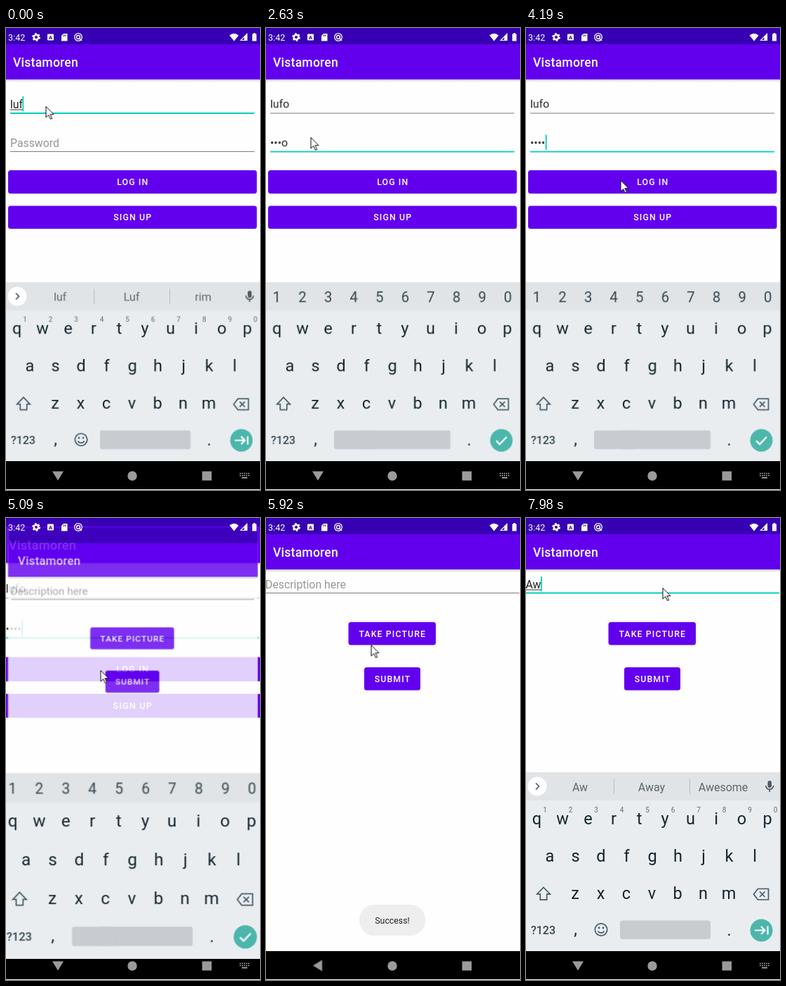
These frames come from a looping animation (362 by 656 pixels, 8000 ms). An HTML page:

```html
<!DOCTYPE html>
<html lang="en">
<head>
<meta charset="utf-8">
<title>Login and post</title>
<style>
  html, body { margin: 0; width: 100%; height: 100%; overflow: hidden; background: #fefefe; }
  svg { display: block; width: 362px; height: 656px; font-family: Roboto, "Noto Sans", sans-serif; }
  text { white-space: pre; }
  .mid { text-anchor: middle; }
  .title { font-size: 17.6px; font-weight: 500; letter-spacing: .2px; fill: #fff; }
  .field { font-size: 15.84px; fill: #222; }
  .hint { font-size: 15.84px; fill: #969696; }
  .label { font-size: 12.32px; font-weight: 500; letter-spacing: 1.12px; fill: #fff; text-anchor: middle; }
  .key { font-size: 23.5px; fill: #14252d; text-anchor: middle; }
  .digit { font-size: 20.5px; fill: #37474f; text-anchor: middle; }
  .tiny { font-size: 10px; fill: #626c71; text-anchor: middle; }
  .word { font-size: 16px; fill: #5c666b; text-anchor: middle; }
  .line { fill: none; stroke: #455a64; stroke-width: 1.7; }
  .white { fill: none; stroke: #fff; stroke-width: 2.2; }
  .accent { fill: #03cfbb; }
  .rest { fill: #7d7d7d; }
</style>
</head>
<body>
<svg viewBox="0 0 362 656">
  <defs>
    <linearGradient id="shade" x2="0" y2="1">
      <stop stop-color="#000" stop-opacity=".2"/><stop offset="1" stop-color="#000" stop-opacity="0"/>
    </linearGradient>
    <g id="frame">
      <rect x="-4.6" width="371.2" height="656" fill="#fefefe"/>
      <rect x="-4.6" y="73" width="371.2" height="4" fill="url(#shade)"/>
      <rect x="-4.6" y="22" width="371.2" height="51" fill="#6200ee"/>
      <rect x="-4.6" width="371.2" height="23" fill="#3700b3"/>
      <text class="title" x="10" y="55">Vistamoren</text>
    </g>
  </defs>

  <g id="login">
    <use href="#frame"/>
    <rect id="userRest" class="rest" x="6" y="120.5" width="348" height="1"/>
    <rect id="userFocus" class="accent" x="6" y="120" width="348" height="2"/>
    <rect id="passRest" class="rest" x="6" y="175" width="348" height="1"/>
    <rect id="passFocus" class="accent" x="6" y="174.7" width="348" height="1.8"/>
    <text id="hint" class="hint" x="6" y="168.5">Password</text>
    <g id="loginText"></g>
    <rect id="userCaret" class="accent" y="97" width="1.8" height="21"/>
    <rect id="passCaret" class="accent" y="151.5" width="1.8" height="21.5"/>
    <g id="loginButtons"></g>
    <rect id="press" x="3" y="202" width="354.5" height="33" rx="3.5" fill="#fff"/>
  </g>

  <g id="home">
    <use href="#frame"/>
    <rect id="postRest" class="rest" y="106" width="361" height="1"/>
    <rect id="postFocus" class="accent" y="105.5" width="361" height="2"/>
    <text id="postHint" class="hint" x="-1" y="99.5">Description here</text>
    <g id="postText"></g>
    <rect id="postCaret" class="accent" y="83" width="1.8" height="21"/>
    <g id="homeButtons"></g>
  </g>

  <rect y="615" width="362" height="40" fill="#000"/>

  <g id="keyboard">
    <rect y="361" width="362" height="254" fill="#e9edf0"/>
    <rect y="361" width="362" height="40" fill="#e0e4e7"/>
    <g id="keys"></g>
    <path class="line" d="M25 524.5l9.3 9.7h-4.6v8h-9.4v-8h-4.6z"/>
    <path class="line" d="M330.5 526.5h15v15.500h-15l-6-7.750zM333 530.500l7.500 7.500m0-7.500l-7.500 7.500"/>
    <text x="24.500" y="590.500" class="mid" font-size="16" font-weight="500" fill="#37474f">?123</text>
    <text x="70.500" y="592" class="key">,</text>
    <text x="289.500" y="593" class="key">.</text>
    <rect x="134" y="571.500" width="129" height="26.500" rx="3" fill="#c8ccd0"/>
    <circle cx="335.500" cy="585.500" r="16" fill="#4db6ac"/>
    <g id="textMode">
      <circle cx="16" cy="381" r="13.500" fill="#fff"/>
      <path class="line" d="M14 376.500l4.500 4.500-4.500 4.500"/>
      <rect x="344.500" y="373" width="5.500" height="10" rx="2.750" fill="#50595e"/>
      <path class="line" stroke-width="1.500" d="M341.800 380a5.400 5.400 0 0 0 10.800 0M347.200 385.500v3.500"/>
      <g id="digits"></g>
      <circle class="line" cx="107" cy="584.500" r="8.700"/>
      <path class="line" d="M102.500 586.500a4.800 4 0 0 0 9 0"/>
      <circle cx="104" cy="582" r="1.400" fill="#455a64"/><circle cx="110" cy="582" r="1.400" fill="#455a64"/>
    </g>
    <g id="passMode">
      <rect x="97" y="571.500" width="60" height="26.500" rx="3" fill="#c8ccd0"/>
    </g>
    <path id="tab" class="white" d="M326 585.500h14m-5-5.500l5.500 5.500-5.500 5.500M344.500 579.500v12"/>
    <path id="check" class="white" d="M328 586l5 5 10-10.500"/>
    <g id="words"></g>
  </g>

  <g id="nav" fill="#9b9b9b">
    <path id="back" d="M66 629.500h16l-8 13z"/>
    <circle cx="180" cy="636" r="6.700"/>
    <rect x="279.500" y="629.500" width="13.500" height="13"/>
    <g id="switcher">
      <path d="M333 632.500h14m-14 3h14" stroke="#b0b0b0" stroke-width="1.700" stroke-dasharray="1.700 1.300" fill="none"/>
      <path d="M336 638.600h8" stroke="#b0b0b0" stroke-width="1.700"/>
    </g>
  </g>

  <g id="status" fill="#fff">
    <text x="3" y="17.500" font-size="12.600">3:42</text>
    <circle cx="43" cy="13" r="3.300" fill="none" stroke="#fff" stroke-width="2.400"/>
    <circle cx="43" cy="13" r="5" fill="none" stroke="#fff" stroke-width="1.800" stroke-dasharray="2.600 2.636"/>
    <rect x="59" y="8.500" width="9" height="9" rx="1"/>
    <text x="63.500" y="16" class="mid" font-size="8" font-weight="700" fill="#3700b3">A</text>
    <path d="M82 8h5.500v10.500h-8.500v-7.500z"/>
    <path d="M82.500 9.500v2.500m2-2.500v2.500" stroke="#3700b3"/>
    <circle cx="103" cy="13" r="5.300" fill="none" stroke="#fff" stroke-width="1.300"/>
    <circle cx="103" cy="13" r="2.500" fill="none" stroke="#fff" stroke-width="1.300"/>
    <path d="M104 14l4 4" stroke="#fff" stroke-width="1.300"/>
    <path d="M318.500 10.500q6.500-5.500 13 0l-6.500 8z"/>
    <path d="M343.500 8.500v9h-9z" fill="none" stroke="#fff" stroke-width="1.200"/>
    <path d="M343.500 8v10h-4v-6z"/>
    <path d="M351 8.500h1.700v-1.500h2.600v1.500h1.700v10h-6z"/>
  </g>

  <g id="toast">
    <rect x="133" y="549" width="94" height="44" rx="21" fill="#ededed" opacity=".9"/>
    <text x="180" y="576" class="mid" font-size="12.320" fill="#222">Success!</text>
  </g>

  <path id="mouse" d="M.5.5v15.500l3.700-3.400 2.700 5.800 2.300-1-2.700-5.700h5z" fill="#fff" stroke="#111" stroke-width="1"/>
</svg>

<script>
const LOOP = 8000;
const $ = id => document.getElementById(id);

// Plays a table of [time, value] rows with hard changes.
function steps(el, prop, rows) {
  const frames = rows.map(([time, value]) =>
    ({ offset: time / LOOP, [prop]: value, easing: 'step-end' }));
  frames.push({ offset: 1, [prop]: rows[rows.length - 1][1] });
  el.animate(frames, { duration: LOOP, iterations: Infinity });
}

// Shows an element only during the given [from, to] spans.
function show(el, ...spans) {
  const rows = spans[0][0] > 0 ? [[0, 0]] : [];
  for (const [from, to] of spans) {
    rows.push([from, 1]);
    if (to < LOOP) rows.push([to, 0]);
  }
  steps(el, 'opacity', rows);
}

function add(parent, tag, attrs, content = '') {
  const el = document.createElementNS($('login').namespaceURI, tag);
  for (const name in attrs) el.setAttribute(name, attrs[name]);
  el.textContent = content;
  $(parent).append(el);
  return el;
}

const write = (parent, cls, x, y, content) => add(parent, 'text', { class: cls, x, y }, content);
const place = (x, y, scale = 1) => `translate(${x}px, ${y}px) scale(${scale})`;
const zoom = scale => place(181 * (1 - scale), 328 * (1 - scale), scale);
const move = (el, rows) => steps(el, 'transform', rows.map(([t, x, y]) => [t, place(x, y)]));

function button(parent, x, y, width, height, label) {
  add(parent, 'rect', { x, y: y + 1, width, height, rx: 3.5, fill: '#000', opacity: .12 });
  add(parent, 'rect', { x, y, width, height, rx: 3.5, fill: '#6200ee' });
  write(parent, 'label', x + width / 2 + .5, y + height / 2 + 4.6, label);
}
button('loginButtons', 3, 202, 354.5, 33, 'LOG IN');
button('loginButtons', 3, 252.5, 354.5, 32.5, 'SIGN UP');
button('homeButtons', 117.5, 147.7, 124.5, 32.5, 'TAKE PICTURE');
button('homeButtons', 140, 212, 80, 32.5, 'SUBMIT');

// Keys
const PITCH = 36.5;
[['qwertyuiop', 15.5, 434.5], ['asdfghjkl', 34, 487.5], ['zxcvbnm', 70, 540.5]].forEach(([row, x, y]) =>
  [...row].forEach((letter, i) => write('keys', 'key', x + i * PITCH, y, letter)));
[...'1234567890'].forEach((digit, i) => {
  write('digits', 'tiny', 27 + i * PITCH, 417.5, digit);
  write('passMode', 'digit', 15.3 + i * 36.6, 389.5, digit);
});

function suggest(from, to, ...words) {
  const row = add('words', 'g', { id: 'words' + from });
  words.forEach((word, i) => write(row.id, 'word', 77 + i * 102, 387.5, word));
  for (const x of [125, 233])
    add(row.id, 'rect', { x, y: 370.5, width: 1, height: 21, fill: '#b4babd' });
  show(row, [from, to]);
}
suggest(0, 150, 'luf', 'Luf', 'rim');
suggest(150, 1100, 'lufo', 'Lufo', 'loft');
suggest(7670, 7980, 'A', 'As', 'About');
suggest(7980, LOOP, 'Aw', 'Away', 'Awesome');

// Typed text
function typed(parent, x, y, rows) {
  for (const [from, to, content] of rows)
    show(write(parent, 'field', x, y, content), [from, to]);
}
function underline(parent, x, y, width, from, to) {
  show(add(parent, 'rect', { x, y, width, height: 1, fill: '#333' }), [from, to]);
}
typed('loginText', 6, 113.5, [[0, 150, 'luf'], [150, LOOP, 'lufo']]);
underline('loginText', 6, 115.5, 18, 0, 150);
underline('loginText', 6, 115.5, 27, 150, 960);
typed('loginText', 6, 168.5, [
  [1780, 1910, 'l'], [1910, 2170, '•u'], [2170, 2630, '••f'], [2630, 3500, '•••o'], [3500, LOOP, '••••']
]);
typed('postText', -.5, 99.5, [[7550, 7980, 'A'], [7980, LOOP, 'Aw']]);
underline('postText', 0, 101.5, 10, 7550, 7980);
underline('postText', 0, 101.5, 21.5, 7980, LOOP);

// Focus and carets
show($('hint'), [0, 1780]);
show($('userFocus'), [0, 960]);
show($('userRest'), [960, LOOP]);
show($('passRest'), [0, 960]);
show($('passFocus'), [960, LOOP]);
show($('userCaret'), [0, 550], [820, 960]);
move($('userCaret'), [[0, 23.3, 0], [150, 32.4, 0]]);
show($('passCaret'), [960, 1370], [1780, 2630], [4190, LOOP]);
move($('passCaret'), [[0, 6, 0], [1780, 10, 0], [1910, 20.5, 0], [2170, 23, 0], [2630, 27.7, 0]]);
show($('postHint'), [0, 7550]);
show($('postRest'), [0, 6460]);
show($('postFocus'), [6460, LOOP]);
show($('postCaret'), [6460, 7120], [7550, LOOP]);
move($('postCaret'), [[0, -.3, 0], [7550, 9.5, 0], [7980, 21, 0]]);
steps($('press'), 'opacity', [[0, 0], [3500, .18], [3630, 0]]);

// Screen change
steps($('login'), 'transform', [[0, zoom(1)], [5090, zoom(1.036)], [5220, zoom(1.05)]]);
steps($('home'), 'transform', [[0, zoom(.9)], [5090, zoom(.959)], [5220, zoom(.995)], [5370, zoom(1)]]);
steps($('home'), 'opacity', [[0, 0], [5090, .82], [5220, 1]]);

// Keyboard
steps($('keyboard'), 'transform', [
  [0, zoom(1)], [5090, zoom(1.036)], [5220, place(0, 40)], [5370, place(0, 300)],
  [6580, place(0, 110)], [6700, place(0, 40)], [6850, place(0, 6)], [6980, place(0, 0)]
]);
steps($('keyboard'), 'opacity', [
  [0, 1], [5220, .5], [5370, 0], [6580, .2], [6700, .6], [6850, .94], [6980, 1]
]);
show($('textMode'), [0, 1100], [5370, LOOP]);
show($('passMode'), [1100, 5370]);
show($('tab'), [0, 1100], [6850, LOOP]);
show($('check'), [1100, 6850]);

// Navigation bar
$('back').style.transformOrigin = '74px 635.5px';
steps($('back'), 'transform', [
  [0, 'rotate(0deg)'], [5220, 'rotate(45deg)'], [5370, 'rotate(90deg)'],
  [6580, 'rotate(60deg)'], [6700, 'rotate(18deg)'], [6850, 'rotate(2deg)'], [6980, 'rotate(0deg)']
]);
steps($('nav'), 'fill', [[0, '#9b9b9b'], [6700, '#f2f2f2'], [6850, '#b4b4b4'], [6980, '#9b9b9b']]);
show($('switcher'), [0, 5220], [6700, LOOP]);

steps($('toast'), 'opacity', [[0, 0], [5370, .5], [5520, 1], [6980, .4], [7120, 0]]);

move($('mouse'), [
  [0, 56.5, 111], [550, 59, 124], [690, 62, 143], [820, 63.5, 155],
  [2760, 70, 162], [2890, 88, 178], [3020, 110, 196], [3150, 127, 210], [3280, 134.5, 216],
  [5790, 140, 203], [5920, 149.5, 180], [6070, 167, 146], [6200, 184, 116], [6330, 194.5, 99]
]);
</script>
</body>
</html>
```
